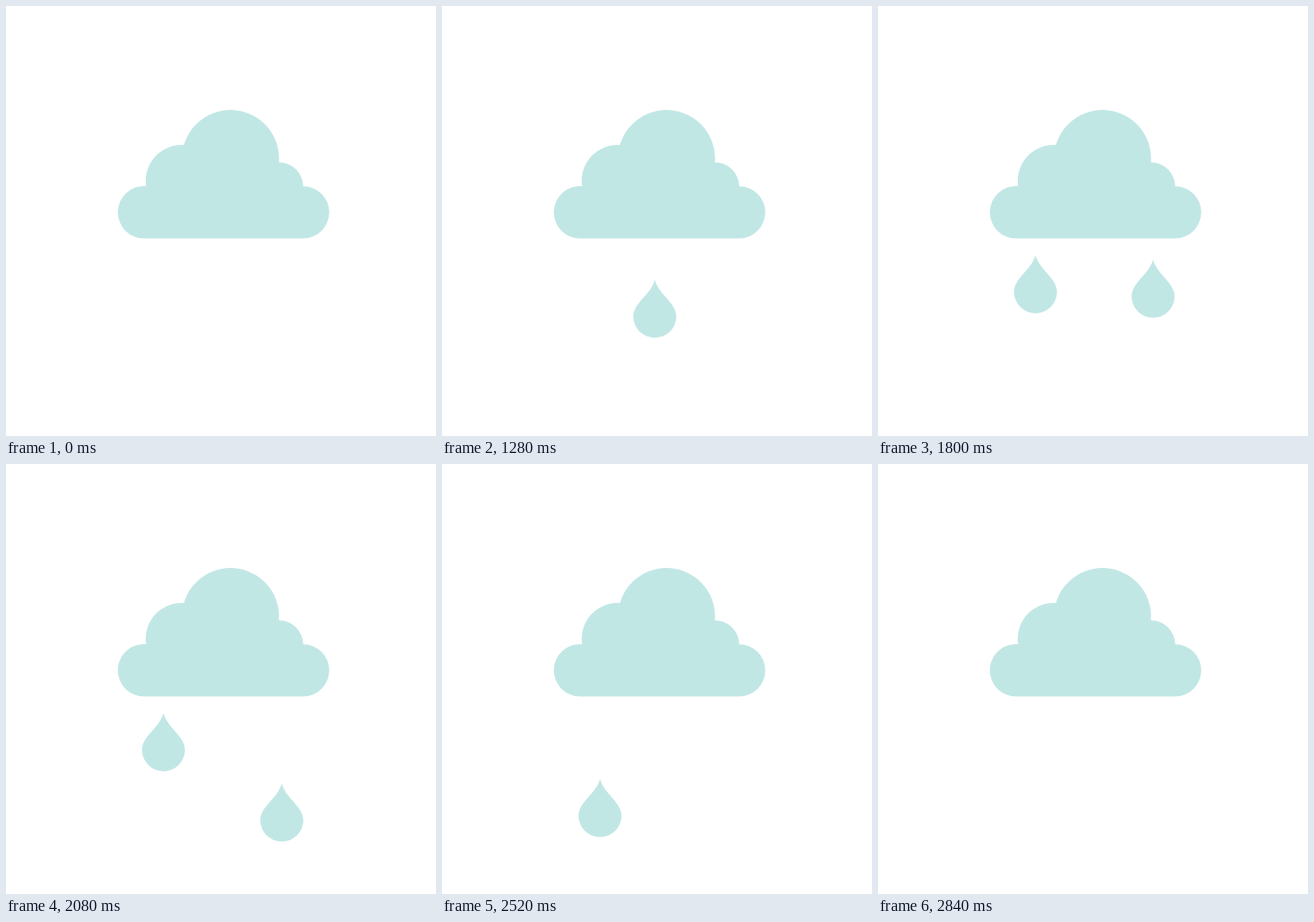
These frames come from a looping animation (480 by 480 pixels, 4.08 s). An HTML page:

```html
<!DOCTYPE html>
<html lang="en">
<head>
<meta charset="utf-8">
<title>Rain cloud</title>
<style>
  html, body { margin: 0; width: 100%; height: 100%; overflow: hidden; background: #fff; }
  svg { display: block; width: 100%; height: 100%; fill: #c1e7e5; }
</style>
</head>
<body>
<svg viewBox="0 0 480 480">
  <path d="M154.3 259.5A29.2 29.2 0 1 1 156.4 201.2A40 40 0 0 1 198.6 155.2A54.15 54.15 0 0 1 304.6 174.6A27.1 27.1 0 0 1 331.8 201.2A29.15 29.15 0 0 1 331.6 259.5Z"/>
</svg>
<script>
const LOOP = 4080, TICK = 40, WAIT = 560, FALL_TICKS = 13;
const SHAPE = "M0-32.5C4-16 24-7 24 8.8A24 23.7 0 0 1-24 8.8C-24-7-4-16 0-32.5Z";

// Resting centre, sideways drift per tick and time of appearance
const drops = [
  { x: 237.9, y: 308.5, drift: -0.16, start: 680 },
  { x: 307.1, y: 315.5, drift: 0.15, start: 1360 },
  { x: 175.8, y: 310.5, drift: 0.12, start: 1800 }
];

const svg = document.querySelector("svg");
for (const drop of drops) {
  drop.el = document.createElementNS(svg.namespaceURI, "path");
  drop.el.setAttribute("d", SHAPE);
  svg.append(drop.el);
}

function draw(time) {
  for (const { x, y, drift, start, el } of drops) {
    const n = Math.max(0, Math.floor((time - start - WAIT) / TICK) + 1);
    const visible = time >= start && n < FALL_TICKS;
    el.style.display = visible ? "" : "none";
    if (!visible) continue;
    // Steady fall, shrinking over the second half
    const scale = Math.min(1, (13.1 - n) / 6.8);
    el.setAttribute("transform", `translate(${x + drift * n} ${y + 14.7 * n}) scale(${scale})`);
  }
}

const begin = performance.now();
function frame() {
  draw((performance.now() - begin) % LOOP);
  requestAnimationFrame(frame);
}
frame();
</script>
</body>
</html>
```
